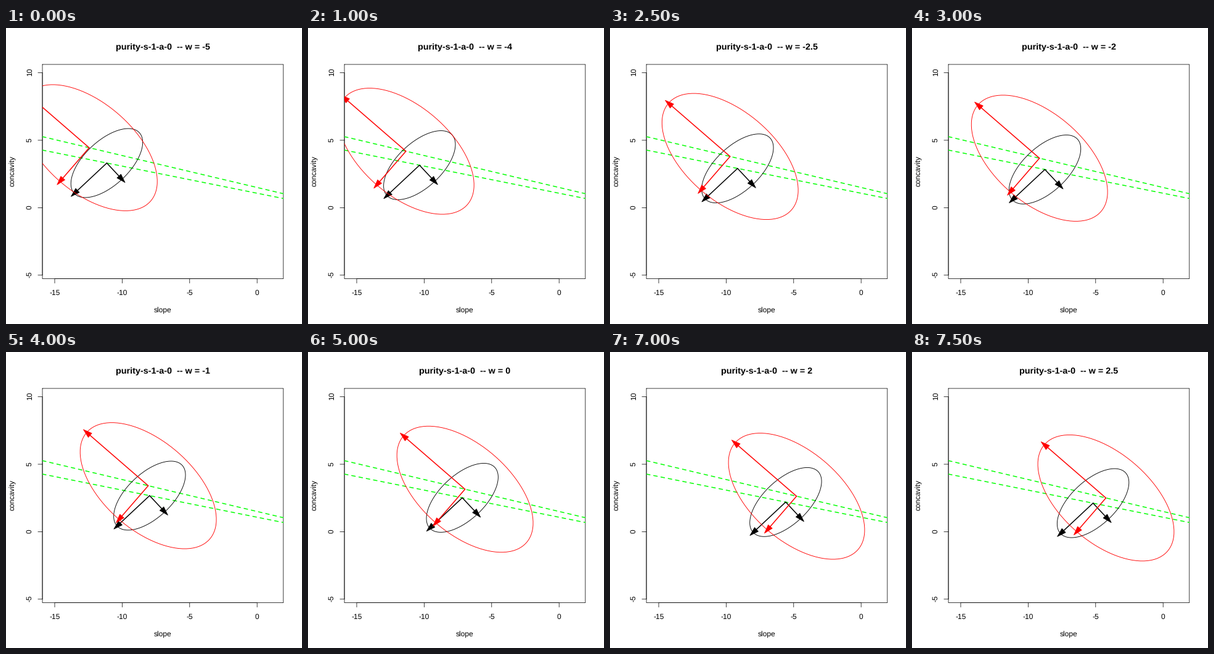
These frames come from a looping animation (480 by 480 pixels, 8 s). A matplotlib script:

```python
import numpy as np
import matplotlib.pyplot as plt
from matplotlib.animation import FuncAnimation
from matplotlib.patches import Polygon, Rectangle

SIZE, DPI = 480, 80
PX = 72 / DPI  # points per pixel
LEFT, TOP, RIGHT, BOTTOM = 59.04, 59.04, 449.76, 406.56
UNIT, X0, Y0 = 21.88, 407.2, 291.4  # pixels per data unit, origin

plt.rcParams["font.family"] = "Liberation Sans"
plt.rcParams["text.hinting"] = "none"

fig = plt.figure(figsize=(SIZE / DPI, SIZE / DPI), dpi=DPI, facecolor="white")
ax = fig.add_axes([0, 0, 1, 1])
ax.set_xlim(0, SIZE)
ax.set_ylim(SIZE, 0)
ax.axis("off")
plot_area = Rectangle((59, 59), 391, 348, transform=ax.transData)


def line(xs, ys, width, color="black", clip=True, **kw):
    artist, = ax.plot(xs, ys, color=color, lw=width * PX, snap=False, **kw)
    if clip:
        artist.set_clip_path(plot_area)
    return artist


def rule(xs, ys):
    return line(xs, ys, 0.75, clip=False, solid_capstyle="round")


def label(x, y, text, size=12, angle=0, **kw):
    return ax.text(x, y, text, fontsize=size * PX, rotation=angle, ha="center",
                   va="baseline", rotation_mode="anchor", **kw)


# Arrow head pointing along +x, centred on the end of its shaft
HEAD = np.array([[7.2, 0], [-7.2, 4.4], [-7.2, -4.4]])
TURN = np.linspace(0, 2 * np.pi, 201)


class Arrow:
    def __init__(self, color, length, direction):
        self.dir = np.array(direction)
        self.length = length
        self.shaft = line([], [], 1.5, color, solid_capstyle="round")
        self.head = Polygon(HEAD, facecolor=color, edgecolor=color,
                            lw=0.75 * PX, joinstyle="round", zorder=2)
        ax.add_patch(self.head)
        self.head.set_clip_path(plot_area)

    def move(self, start):
        end = start + self.length * self.dir
        self.shaft.set_data(*zip(start, end))
        c, s = self.dir
        self.head.set_xy(HEAD @ np.array([[c, s], [-s, c]]) + end)


class Cloud:
    """Ellipse with its two main axes, sliding along a straight line."""

    def __init__(self, color, centre, step, axes, angle):
        self.centre, self.step = np.array(centre), np.array(step)
        phi = np.radians(angle)
        major = np.array([np.cos(phi), np.sin(phi)])
        minor = np.array([np.sin(phi), -np.cos(phi)])
        a, b = axes
        self.ring = (np.outer(np.cos(TURN), a * major)
                     + np.outer(np.sin(TURN), b * minor))
        self.outline = line([], [], 0.9, color)
        self.arrows = [Arrow(color, a, major), Arrow(color, b, minor)]

    def move(self, w):
        centre = self.centre + w * self.step
        self.outline.set_data(*(self.ring + centre).T)
        for arrow in self.arrows:
            arrow.move(centre)


rule([LEFT, RIGHT, RIGHT, LEFT, LEFT], [TOP, TOP, BOTTOM, BOTTOM, TOP])
rule([X0 - 15 * UNIT, X0], [BOTTOM, BOTTOM])
rule([LEFT, LEFT], [Y0 - 10 * UNIT, Y0 + 5 * UNIT])
for v in (-15, -10, -5, 0):
    x = X0 + v * UNIT
    rule([x, x], [BOTTOM, BOTTOM + 7.2])
    label(x, 432.5, str(v))
for v in (-5, 0, 5, 10):
    y = Y0 - v * UNIT
    rule([LEFT - 7.2, LEFT], [y, y])
    label(41.8, y - 0.8, str(v), angle=90)
label(254.4, 461.5, "slope")
label(13.8, 231.8, "concavity", angle=90)
title = label(254.4, 34.8, "", size=14.4, weight="bold")

for y1, y2 in ((176.2, 268.7), (198, 276.5)):
    line([LEFT, RIGHT], [y1, y2], 1.5, "#00ff00", dashes=(4, 4),
         dash_capstyle="round")

clouds = [
    Cloud("black", (250.2, 236.4), (17.35, 3.48), (72.2, 36.1), 136.9),
    Cloud("red", (254.6, 222.5), (23.95, 5.67), (132, 72.3), 220.9),
]


def draw(i):
    w = -5 + i / 2
    title.set_text(f"purity-s-1-a-0  -- w = {w:g}")
    for cloud in clouds:
        cloud.move(w)


anim = FuncAnimation(fig, draw, frames=16, interval=500, repeat=True,
                     repeat_delay=0)
plt.show()
```
